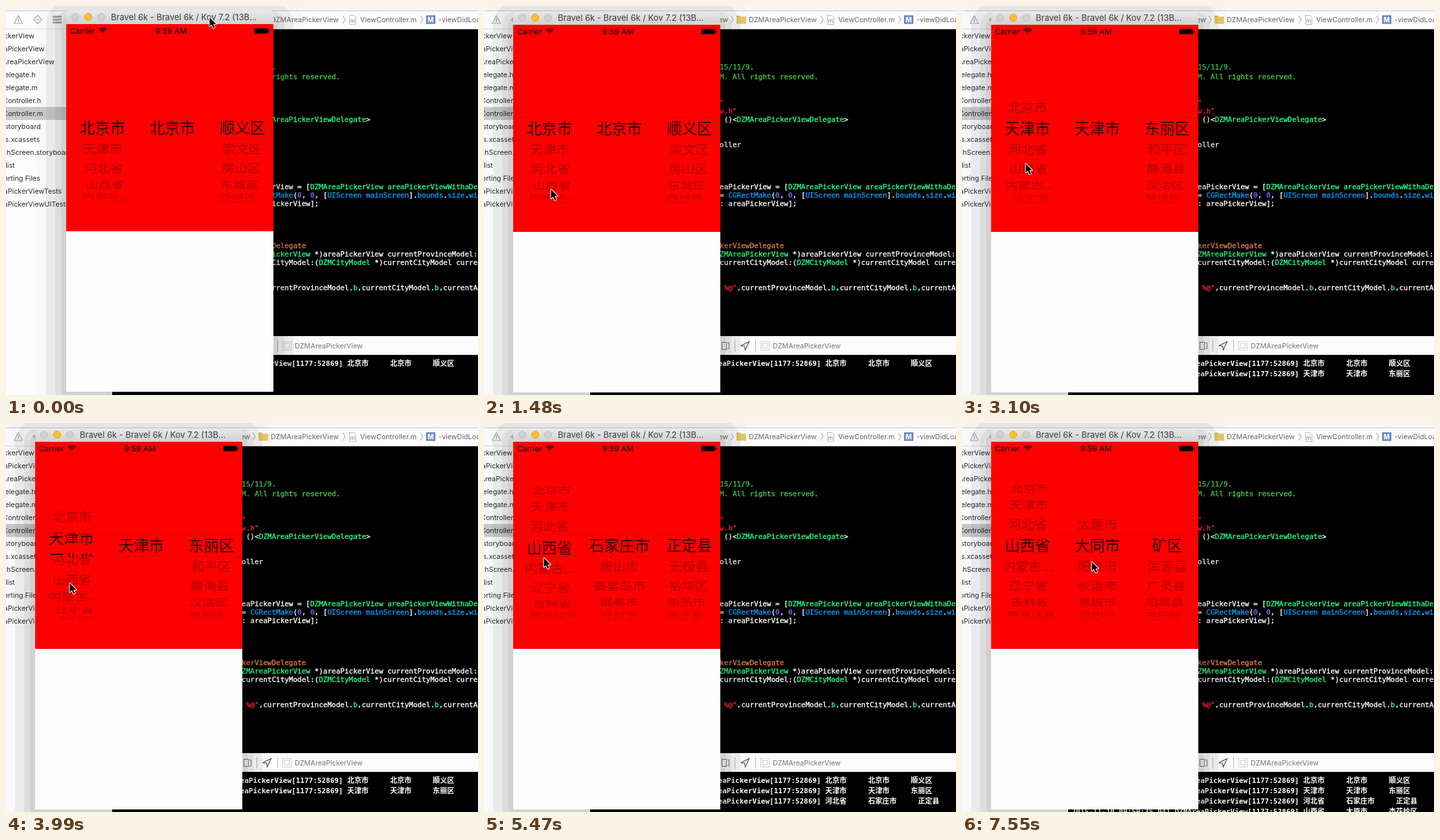
An HTML page with a canvas that plays this animation: 729 by 601 pixels, repeating every 7990 ms.

```html
<!DOCTYPE html>
<html lang="zh">
<head>
<meta charset="utf-8">
<title>Area picker</title>
<style>
html, body { margin: 0; width: 100%; height: 100%; overflow: hidden; background: #fff; }
canvas { display: block; }
</style>
</head>
<body>
<canvas id="stage" width="729" height="601"></canvas>
<script>
const g = document.getElementById('stage').getContext('2d');
const LOOP = 7990, BEAT = LOOP / 54;
const FONT = 'Inter, "Open Sans", sans-serif', UI = '10.8px ' + FONT;
const CJK = '"Noto Sans CJK SC", "Noto Sans CJK", sans-serif';
const MONO = '"DejaVu Sans Mono", "Noto Sans CJK SC", monospace';
const CHAR = 6.623;
const WHITE = '#fff', GREEN = '#23ff83', BLUE = '#00a0ff', RED = '#ff2c38';
const COMMENT = '#41cc45', PURPLE = '#786dff', ORANGE = '#e47c48', GRAY = '#666';

// The pointer glides to each grab point, then pulls a wheel on by one row
const DRAGS = [
  { glide: 5, grab: 10, pull: 11, drop: 20, from: [103, 283], to: [98, 243], wheel: 0 },
  { glide: 22, grab: 25, pull: 25, drop: 30, from: [99, 262], to: [97, 219], wheel: 0 },
  { glide: 30, grab: 33, pull: 33, drop: 38, from: [95, 248], to: [92, 203], wheel: 0 },
  { glide: 40, grab: 43, pull: 44, drop: 50, from: [204, 250], to: [200, 214], wheel: 1 }
];

const split = s => s.split(' ');
const provinces = split('北京市 天津市 河北省 山西省 内蒙古... 辽宁省 吉林省 黑龙江省 上海市 江苏省');
const shanxi = split('太原市 大同市 阳泉市 长治市 晋城市 朔州市 晋中市 运城市');
const cities = [['北京市'], ['天津市'], split('石家庄市 唐山市 秦皇岛市 邯郸市 邢台市 保定市'), shanxi, shanxi];
const areas = ['顺义区 崇文区 房山区 东城区 西城区 密云县', '东丽区 和平区 静海县 汉沽区 塘沽区 宁河县',
  '正定县 无极县 裕华区 新乐市 深泽县 赞皇县', '杏花岭区 古交市 小店区 阳曲县 晋源区 万柏林区',
  '矿区 浑源县 广灵县 阳高县 南郊区 左云县'].map(split);

// Leading spaces give the depth in the tree
const sidebar = `DZMAreaPickerView
 DZMAreaPickerView
  DZMAreaPickerView
  AppDelegate.h
  AppDelegate.m
  ViewController.h
  ViewController.m
  Main.storyboard
  Assets.xcassets
  LaunchScreen.storyboard
  Info.plist
  Supporting Files
 DZMAreaPickerViewTests
 DZMAreaPickerViewUITests
 Products`.split('\n');

// Each line: y, then text and colour pairs
const code = [
  [94, ' 15/11/9.', COMMENT],
  [109, ' M. All rights reserved.', COMMENT],
  [149, ' "', RED],
  [162, ' w.h"', RED],
  [175, '  ()<', WHITE, 'DZMAreaPickerViewDelegate', GREEN, '>', WHITE],
  [214, ' oller', WHITE],
  [279, ' eaPickerView = [', WHITE, 'DZMAreaPickerView areaPickerViewWithaDe', GREEN],
  [292, ' = ', WHITE, 'CGRectMake', BLUE, '(', WHITE, '0', PURPLE, ', ', WHITE, '0', PURPLE, ', [', WHITE,
    'UIScreen mainScreen', BLUE, '].', WHITE, 'bounds', BLUE, '.', WHITE, 'size', BLUE, '.', WHITE, 'width', BLUE],
  [305, ' : areaPickerView];', WHITE],
  [370, ' kerViewDelegate', ORANGE],
  [383, 'DZMAreaPickerView', GREEN, ' *)areaPickerView currentProvinceModel:', WHITE],
  [396, ' currentCityModel:(', WHITE, 'DZMCityModel', GREEN, ' *)currentCityModel current', WHITE],
  [435, '  %@"', RED, ',currentProvinceModel.', WHITE, 'b', GREEN, ',currentCityModel.', WHITE, 'b', GREEN,
    ',currentArea', WHITE]
];

const part = (n, a, b) => Math.min(1, Math.max(0, (n - a) / (b - a)));
const ease = (n, a, b) => { const t = part(n, a, b); return t * t * (3 - 2 * t); };
const mix = (p, q, f) => p.map((v, i) => v + (q[i] - v) * f);

const windowAt = n => [Math.round(93 - 48 * (1 - (1 - part(n, 0, 3)) ** 2.3)), n ? 1 : 0];

function cursorAt(n) {
  const [x, y] = windowAt(n);
  return DRAGS.reduce((p, d) =>
    mix(mix(p, d.from, ease(n, d.glide, d.grab)), d.to, ease(n, d.pull, d.drop)), [x + 221, y + 17]);
}

const spinAt = (n, wheel) => DRAGS.filter(d => d.wheel === wheel)
  .reduce((sum, d) => sum + ease(n, d.pull, d.drop), 0);

function rect(x, y, w, h, color) {
  g.fillStyle = color;
  g.fillRect(x, y, w, h);
}

function round(x, y, w, h, r, fill) {
  g.fillStyle = fill;
  g.beginPath();
  g.roundRect(x, y, w, h, r);
  g.fill();
}

function text(s, x, y, font, color, align = 'left') {
  g.font = font;
  g.fillStyle = color;
  g.textAlign = align;
  g.fillText(s, x, y);
}

function line(color, width, ...p) {
  g.strokeStyle = color;
  g.lineWidth = width;
  g.beginPath();
  for (let i = 0; i < p.length; i += 2) g.lineTo(p[i], p[i + 1]);
  g.stroke();
}

function disc(x, y, r, fill, edge) {
  g.beginPath();
  g.arc(x, y, r, 0, 7);
  g.fillStyle = fill;
  g.fill();
  g.strokeStyle = edge;
  g.lineWidth = 1;
  g.stroke();
}

function clipped(x, y, w, h, draw) {
  g.save();
  g.beginPath();
  g.rect(x, y, w, h);
  g.clip();
  draw();
  g.restore();
}

function drawBars() {
  rect(0, 0, 729, 601, '#fcfcfc');
  rect(0, 0, 729, 7, '#f6f6f6');
  rect(0, 7, 729, 1, '#c9c9c9');
  rect(0, 35, 729, 1, '#dadada');
  line('#a8a8a8', 1.2, 12.5, 27, 19, 15, 25.5, 27, 12, 27);
  line('#a8a8a8', 1.4, 19, 19, 19, 25);
  line('#a8a8a8', 1.2, 42.5, 21, 49, 14.5, 55.5, 21, 49, 27.5, 42, 20.5);
  line('#a8a8a8', 1.2, 46, 21, 52, 21);
  for (let i = 0; i < 3; i++) rect(72, 15 + i * 4.5, 14, 3, '#a8a8a8');

  for (const x of [381, 520, 640]) line('#999', 1, x, 15, x + 4, 21, x, 27);
  text('DZMAreaPickerView', 377, 25, UI, GRAY, 'right');
  rect(390, 15, 6, 3, '#d9b347');
  rect(390, 16.5, 15, 11, '#e8c766');
  text('DZMAreaPickerView', 409, 25, UI, GRAY);
  line('#bbb', 1, 530.5, 14.5, 537.5, 14.5, 540.5, 17.5, 540.5, 28.5, 530.5, 28.5, 530.5, 14);
  text('m', 535.5, 26, '9px ' + FONT, '#b06a8c', 'center');
  text('ViewController.m', 547, 25, UI, GRAY);
  rect(649, 14.5, 14, 13, '#4a68ac');
  rect(650, 15.5, 12, 11, '#7d97d0');
  text('M', 656, 25, 'bold 10px ' + FONT, '#fff', 'center');
  text('-viewDidLoad', 668, 25, UI, GRAY);

  g.strokeStyle = '#777';
  g.lineWidth = 1;
  g.strokeRect(367.5, 519.5, 7, 11);
  line('#777', 1, 376, 520.5, 378.5, 520.5, 378.5, 529.5, 376, 529.5);
  for (const x of [387.5, 419.5]) line('#b5b5b5', 1, x, 516, x, 534);
  line('#444', 1.1, 396.5, 525, 409.5, 518.5, 403.5, 531.5, 402.5, 525.5, 396.5, 525);
  g.setLineDash([2, 1]);
  g.strokeStyle = '#bbb';
  g.strokeRect(427.5, 518.5, 13, 13);
  g.strokeRect(430.5, 521.5, 7, 7);
  g.setLineDash([]);
  text('DZMAreaPickerView', 446, 529, UI, '#757575');
}

function drawEditor(rows) {
  drawBars();
  rect(0, 156, 164, 20, '#cacaca');
  sidebar.forEach((s, i) => {
    const name = s.trim();
    text(name, -61 + 15.5 * (s.length - name.length), 50 + i * 20, UI, '#2c2c2c');
  });

  rect(164, 36, 565, 474, '#000');
  for (const [y, ...parts] of code) {
    let x = 357.4;
    for (let i = 0; i < parts.length; i += 2) {
      text(parts[i], x, y + 4, '11px ' + MONO, parts[i + 1]);
      g.strokeStyle = parts[i + 1];
      g.lineWidth = .35;
      g.strokeText(parts[i], x, y + 4);
      x += parts[i].length * CHAR;
    }
  }

  rect(164, 539, 565, 62, '#000');
  for (let i = 0; i < rows; i++) {
    const row = [provinces[i], cities[i][0], areas[i][0]].join('     ');
    text('2015-11-10 09:59:35.041 DZMAreaPickerView[1177:52869] ' + row, 169.5, 556 + i * 16,
      'bold 11px ' + MONO, WHITE);
  }
}

// Coordinates below are relative to the phone window
function drawWheel(list, cx, spin) {
  const mid = 188;
  const small = () => list.forEach((s, i) => {
    const a = (i - spin) * .286;
    if (Math.abs(a) > 1.5) return;
    const c = Math.cos(a), k = 1 - .1 * (1 - c);
    g.save();
    g.translate(160 + (cx - 160) * k, mid + 116 * Math.sin(a));
    g.scale(k, c);
    text(s, 0, 7.7, '300 20.4px ' + CJK, `rgba(0,0,0,${.32 * Math.min(1, c + .45)})`, 'center');
    g.restore();
  });
  clipped(0, 70, 320, 101, small);
  clipped(0, 206, 320, 98, small);
  clipped(0, 171, 320, 35, () => list.forEach((s, i) =>
    text(s, cx, mid + 9 + (i - spin) * 35, '300 23.4px ' + CJK, 'rgba(0,0,0,.86)', 'center')));
}

function drawPhone(n, stage) {
  g.save();
  g.translate(...windowAt(n));
  for (const d of [46, 31, 17, 8])
    round(-d, 25 - d, 320 + 2 * d, 571 + 2 * d, d + 3, `rgba(0,0,0,${d > 40 ? .015 : .055})`);

  const bar = g.createLinearGradient(0, 7, 0, 28);
  bar.addColorStop(0, '#e9e9e9');
  bar.addColorStop(1, '#d1d1d1');
  round(0, 7, 320, 22, [5, 5, 0, 0], bar);
  for (const x of [14, 54]) disc(x, 17, 5.5, '#d0d0d0', '#bcbcbc');
  disc(34, 17, 5.5, '#ffbe2f', '#dfa023');
  text('Bravel 6k - Bravel 6k / Kov 7.2 (13B...', 69, 22, '13px ' + FONT, '#3c3c3c');

  rect(0, 28, 320, 320, '#f00');
  rect(0, 348, 320, 248, '#fdfdfd');
  text('Carrier', 6, 42.5, '11.8px ' + FONT, '#000');
  text('9:59 AM', 162, 42.5, '12.2px ' + FONT, '#000', 'center');
  g.strokeStyle = '#000';
  g.lineWidth = 1.6;
  for (const r of [2, 5, 8]) {
    g.beginPath();
    g.arc(56.5, 42, r, -Math.PI * .76, -Math.PI * .24);
    g.stroke();
  }
  round(290.5, 34.5, 21.5, 8, 1.5, '#000');
  rect(313, 37, 1.3, 3, '#000');

  for (const y of [171, 205]) rect(0, y, 320, 1, 'rgba(0,0,0,.09)');
  drawWheel(provinces, 56, spinAt(n, 0));
  drawWheel(cities[stage], 164, spinAt(n, 1));
  drawWheel(areas[stage], 272, 0);
  g.restore();
}

function drawCursor(n) {
  g.save();
  g.translate(...cursorAt(n).map(Math.round));
  const arrow = new Path2D('M.5 .5V14.5L3.7 11.5 6.2 17.2 8.6 16.1 6.2 10.7H10.6Z');
  g.lineJoin = 'round';
  g.strokeStyle = '#fff';
  g.lineWidth = 2;
  g.stroke(arrow);
  g.fillStyle = '#000';
  g.fill(arrow);
  g.restore();
}

function frame(now) {
  const n = Math.floor((now % LOOP + 10) / BEAT) % 54;
  const stage = DRAGS.filter(d => n >= d.drop).length;
  drawEditor(Math.min(stage + 1, 4));
  drawPhone(n, stage);
  drawCursor(n);
  requestAnimationFrame(frame);
}
requestAnimationFrame(frame);
</script>
</body>
</html>
```
